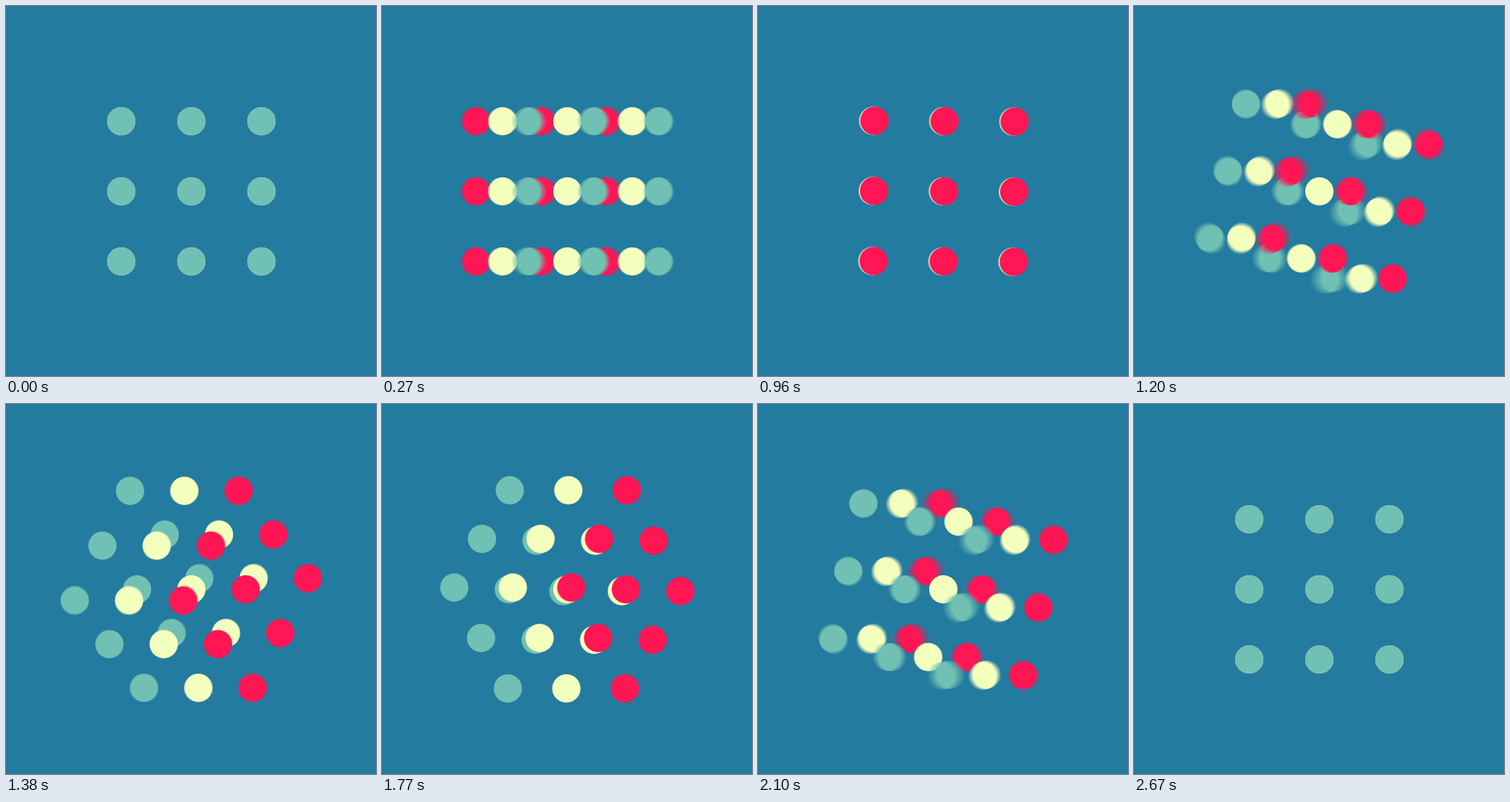
Animation, 512 px wide and 512 px high, one loop 2.7 s. Source, as an HTML page with a canvas:

```html
<!DOCTYPE html>
<html>
<head>
<meta charset="utf-8">
<title>Dot cube</title>
<style>
html, body { margin: 0; width: 100%; height: 100%; overflow: hidden; background: #247ba0; }
canvas { display: block; width: 100vmin; height: 100vmin; }
</style>
</head>
<body>
<canvas id="stage" width="512" height="512"></canvas>
<script>
const SIZE = 512, CENTER = 256.5, GAP = 97, RADIUS = 19.6;
const LOOP = 2700, SHUTTER = 18, SAMPLES = 8;
const BACKGROUND = '#247ba0';
const LAYERS = ['#ff1654', '#f3ffbd', '#70c1b3'];
const STEPS = [-1, 0, 1];
const ISO = Math.atan(Math.SQRT2);

const stage = document.getElementById('stage').getContext('2d');
const buffer = document.createElement('canvas');
buffer.width = buffer.height = SIZE;
const pen = buffer.getContext('2d');

// Ease along cubic-bezier(a, 0, b, 1)
function bezierEase(a, b) {
  return (time, start, duration) => {
    const x = (time - start) / duration;
    if (x <= 0) return 0;
    if (x >= 1) return 1;
    let low = 0, high = 1, s;
    for (let i = 0; i < 24; i++) {
      s = (low + high) / 2;
      const r = 1 - s;
      if (3 * s * r * r * a + 3 * s * s * r * b + s * s * s < x) low = s;
      else high = s;
    }
    return s * s * (3 - 2 * s);
  };
}

const turnEase = bezierEase(0.7, 0.15);
const rollEase = bezierEase(0.56, 0.3);

// Face-on half turn, then the isometric view, then back to the first face
function turnAt(t) {
  return Math.PI * turnEase(t, 4, 864)
    + ISO * turnEase(t, 872, 744)
    + (Math.PI - ISO) * turnEase(t, 1655, 864);
}

function rollAt(t) {
  return -Math.PI / 4 * (rollEase(t, 900, 750) + rollEase(t, 1655, 864));
}

function drawCube(t) {
  const turn = turnAt(t), roll = rollAt(t);
  const sinT = Math.sin(turn), cosT = Math.cos(turn);
  const sinR = Math.sin(roll), cosR = Math.cos(roll);
  const dots = [];
  for (const layer of STEPS) for (const row of STEPS) for (const col of STEPS) {
    const across = col * cosR - row * sinR;
    dots.push({
      x: across * cosT + layer * sinT,
      y: col * sinR + row * cosR,
      depth: layer * cosT - across * sinT,
      color: LAYERS[layer + 1]
    });
  }
  dots.sort((p, q) => p.depth - q.depth);

  pen.fillStyle = BACKGROUND;
  pen.fillRect(0, 0, SIZE, SIZE);
  for (const dot of dots) {
    pen.fillStyle = dot.color;
    pen.beginPath();
    pen.arc(CENTER + GAP * dot.x, CENTER + GAP * dot.y, RADIUS, 0, 2 * Math.PI);
    pen.fill();
  }
}

// Motion blur: average several moments around the current time
function render(now) {
  const t = now % LOOP;
  for (let i = 0; i < SAMPLES; i++) {
    drawCube(t + SHUTTER * ((i + 0.5) / SAMPLES - 0.5));
    stage.globalAlpha = 1 / (i + 1);
    stage.drawImage(buffer, 0, 0);
  }
}

let begin;
function tick(now) {
  begin ??= now;
  render(now - begin);
  requestAnimationFrame(tick);
}
render(0);
requestAnimationFrame(tick);
</script>
</body>
</html>
```
